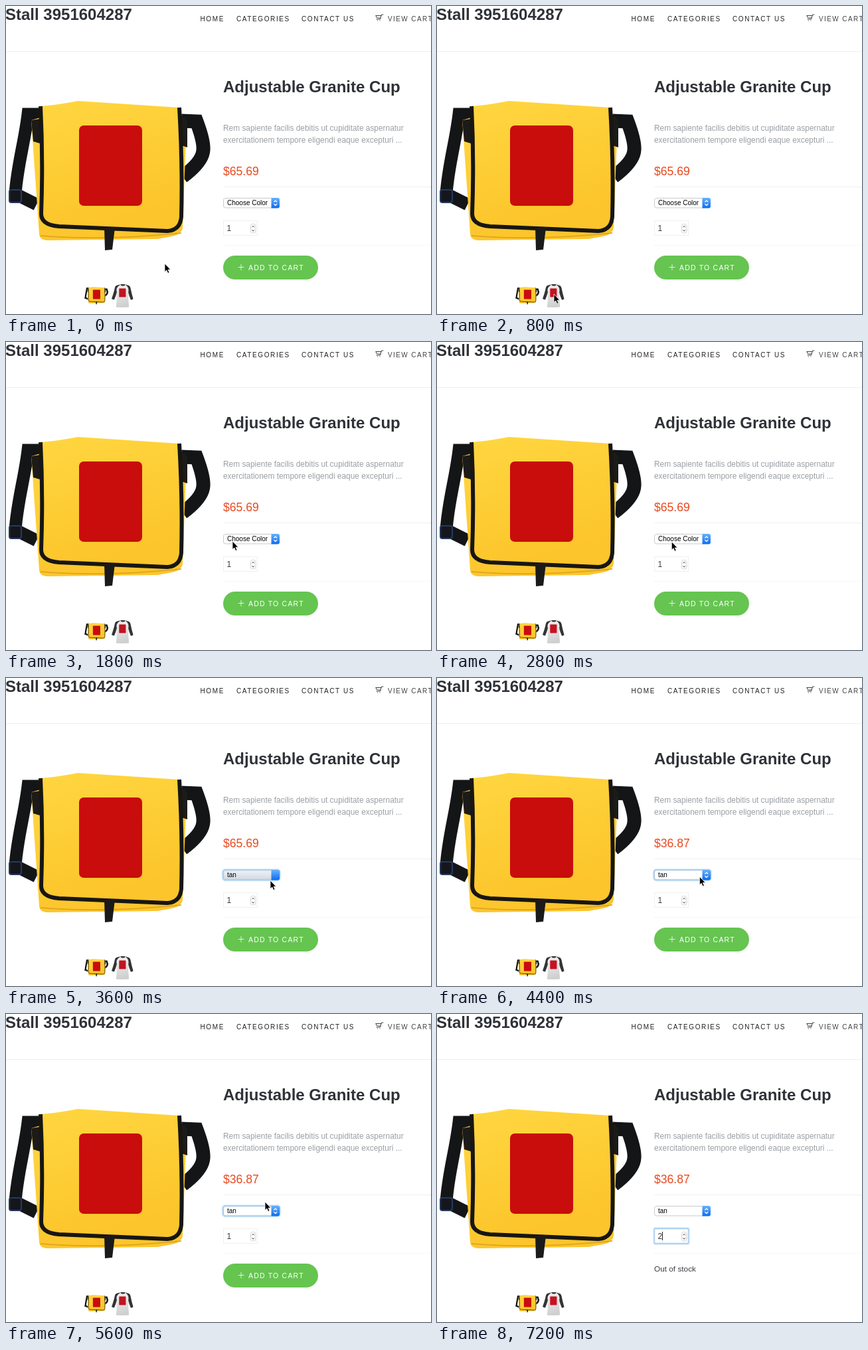
Animation, 640 px wide and 464 px high, one loop 7.4 s. Source, as an HTML page:

```html
<!DOCTYPE html>
<html lang="en">
<head>
<meta charset="utf-8">
<title>Product page</title>
<style>
  html, body { margin: 0; width: 100%; height: 100%; overflow: hidden; background: #fff; }
  svg { display: block; width: 100%; height: 100%; font-family: "Liberation Sans", Arial, sans-serif; }
  .title { font-size: 24px; font-weight: bold; fill: #2f3238; }
  .nav { font-size: 10px; letter-spacing: 1.6px; fill: #222; }
  .nav .light { letter-spacing: 1.4px; fill: #444; }
  .body { font-size: 11.9px; fill: #9a9fa5; }
  .dark { fill: #3a3d42; }
  .line { fill: none; stroke: #efefef; }
  .icon { fill: none; stroke-linecap: round; stroke-linejoin: round; }
  .ring { fill: none; stroke: #a5cdf0; stroke-width: 1.3; filter: drop-shadow(0 0 .8px #a5cdf0); }
</style>
</head>
<body>
<svg viewBox="0 0 640 464">
  <defs>
    <linearGradient id="yellow" x2=".3" y2="1">
      <stop stop-color="#ffd640"/><stop offset="1" stop-color="#fcc52b"/>
    </linearGradient>
    <linearGradient id="cloth" x2=".15" y2="1">
      <stop stop-color="#efeff0"/><stop offset=".5" stop-color="#e2e2e3"/>
      <stop offset="1" stop-color="#cfcfd0"/>
    </linearGradient>
    <linearGradient id="blue" x2="0" y2="1">
      <stop stop-color="#69b1fa"/><stop offset="1" stop-color="#0d6cf2"/>
    </linearGradient>
    <linearGradient id="gray" x2="0" y2="1">
      <stop stop-color="#f0f2f5"/><stop offset="1" stop-color="#d3d9e1"/>
    </linearGradient>

    <g id="bag">
      <g fill="none" stroke="#141517">
        <path d="M50 163H33C28 205 17 240 14 283L46 299" stroke-width="19"/>
        <path d="M264 173L287 174C293 190 298 206 297 217Q296 235 266 257" stroke-width="21"/>
      </g>
      <rect x="5" y="277" width="18" height="19" rx="3" fill="#15161b" stroke="#26395f" stroke-width="2"/>
      <path d="M38 172L52 168H264L272 172L266 334Q264 345 250 347L228 351L62 353Q50 352 50 343Z" fill="url(#yellow)"/>
      <path d="M52 346Q150 354 264 342" fill="none" stroke="#d9a01c" stroke-width="1.500"/>
      <path d="M38 172L51 170V207L41 204ZM264 164L273 172V213L264 210Z" fill="#1d1b18"/>
      <path d="M52 151Q85 148 108 143L261 153Q266 240 264 318Q262 338 243 339L80 332Q53 330 53 313Q56 230 52 151Z" fill="url(#yellow)"/>
      <path d="M261 153Q266 240 264 318Q262 338 243 339L80 332Q53 330 53 313Q56 230 52 151" fill="none" stroke="#171614" stroke-width="6"/>
      <path d="M148 334H164L160 367L149 368Z" fill="#1b1a1a"/>
      <rect x="110" y="180" width="95" height="121" rx="7" fill="#c90c0c"/>
    </g>

    <g id="shirt">
      <path d="M131 112Q165 130 199 112L238 175Q228 270 244 390Q242 400 230 401Q150 406 77 402Q92 290 84 175Z" fill="url(#cloth)"/>
      <path d="M132 109C126 124 88 132 83 180L87 207C80 242 66 275 54 306Q34 305 20 293C36 247 52 200 60 155Q64 130 82 121Z" fill="#333436"/>
      <path d="M198 109C204 124 234 132 238 180L235 210C241 244 254 275 267 307Q287 304 298 294C284 247 272 200 264 155Q260 134 244 123Z" fill="#333436"/>
      <path d="M131 108Q165 102 199 109Q193 128 165 128Q138 127 131 108Z" fill="#2a2b2d"/>
      <path d="M141 110Q165 106 189 110Q181 119 165 119Q149 119 141 110Z" fill="#4b4c50"/>
      <rect x="116" y="159" width="87" height="112" rx="6" fill="#c5131f"/>
    </g>
  </defs>

  <rect width="640" height="464" fill="#fff"/>
  <text class="title" x="-1" y="21">Stall 3951604287</text>
  <g class="nav">
    <text x="292.5" y="23">HOME</text>
    <text x="347" y="23">CATEGORIES</text>
    <text x="445" y="23">CONTACT US</text>
    <text class="light" x="575" y="23">VIEW CART</text>
  </g>
  <path class="icon" stroke="#444" d="M568 13H565.500L563.500 20H558M557 14.500H565M557 14.500L558.500 18H564M559.500 22V22.100M563 22V22.100"/>
  <path class="line" d="M0 68.500H640M328 272.500H640"/>
  <path class="line" d="M328 360.500H640" stroke-dasharray="2 2"/>

  <use id="photo" href="#bag"/>
  <use href="#bag" transform="translate(118 406.400) scale(.117)"/>
  <use href="#shirt" transform="translate(156.700 406.800) scale(.117)"/>

  <text class="title" x="327" y="130" font-size="24.500">Adjustable Granite Cup</text>
  <text class="body" x="327" y="188">Rem sapiente facilis debitis ut cupiditate aspernatur</text>
  <text class="body" x="327" y="206">exercitationem tempore eligendi eaque excepturi ...</text>
  <text id="price" x="327" y="255" font-size="17.600" fill="#e9491f"></text>

  <rect id="colorBox" x="327.500" y="289.500" width="84" height="14.500" rx="3" stroke="#c9c9c9"/>
  <rect id="colorRing" class="ring" x="326.500" y="289" width="86" height="15.500" rx="3.500"/>
  <path d="M399.500 289H409Q412 289 412 292V301.500Q412 304.500 409 304.500H399.500Z" fill="url(#blue)"/>
  <path id="colorArrows" class="icon" stroke="#fff" stroke-width="1.200" d="M403.800 295L405.800 293L407.800 295M403.800 298.500L405.800 300.500L407.800 298.500"/>
  <text id="color" x="333" y="300" font-size="10"></text>

  <rect x="327.500" y="323.500" width="51" height="22" fill="#fff" stroke="#f0f0f0"/>
  <rect id="countRing" class="ring" x="327" y="323" width="52" height="23" rx="1"/>
  <text id="count" class="dark" x="332.500" y="338.500" font-size="12"></text>
  <path id="caret" stroke="#222" d="M339.500 328V341"/>
  <rect x="368.500" y="328.500" width="7.500" height="13.500" rx="3" fill="#fff" stroke="#d4d4d4"/>
  <path class="icon" stroke="#444" d="M370.700 333L372.200 331.300L373.700 333M370.700 337.500L372.200 339.200L373.700 337.500"/>

  <g id="button">
    <rect x="327" y="376" width="143" height="36" rx="18" fill="#65c550"/>
    <path d="M349.500 393.500H358.500M354 389V398" stroke="#fff" stroke-width=".8"/>
    <text x="365" y="398" font-size="10.500" letter-spacing="1.200" fill="#fff">ADD TO CART</text>
  </g>
  <text id="soldOut" class="dark" x="327" y="388" font-size="11.800">Out of stock</text>

  <path id="cursor" d="M0 0V12.500L2.800 10L4.800 14.500L7 13.500L5 9.200H8.800Z" fill="#000" stroke="#fff" stroke-width=".8"/>
</svg>
<script>
  const LOOP = 7400, STEP = 200;
  const $ = id => document.getElementById(id);
  const show = (id, on) => $(id).setAttribute("visibility", on ? "visible" : "hidden");

  // time, x, y
  const path = [
    [0, 239, 388], [200, 239, 388], [800, 176, 434], [1200, 140, 434],
    [1800, 341, 300], [2600, 345, 300], [3400, 398, 305], [3800, 398, 305],
    [4800, 394, 296], [5600, 390, 283], [6200, 348, 333], [LOOP, 348, 333]
  ];

  function cursorAt(t) {
    const i = path.findIndex(p => p[0] > t);
    const [t0, x0, y0] = path[i - 1], [t1, x1, y1] = path[i];
    const u = (t - t0) / (t1 - t0), k = u * u * (3 - 2 * u);
    return [x0 + (x1 - x0) * k, y0 + (y1 - y0) * k];
  }

  function draw(t) {
    const between = (a, b = LOOP) => t >= a && t < b;
    const blue = between(4600, 5400), pressed = between(3600, 3800);
    const typed = between(6800), soldOut = between(7000);

    $("photo").setAttribute("href", blue ? "#shirt" : "#bag");
    $("price").textContent = t < 3800 || blue ? "$65.69" : "$36.87";
    $("color").textContent = t < 3600 ? "Choose Color" : blue ? "blue" : "tan";
    $("colorBox").setAttribute("fill", pressed ? "url(#gray)" : "#fff");
    show("colorRing", between(3600, 6400));
    show("colorArrows", !pressed);

    $("count").textContent = typed ? "2" : "1";
    show("countRing", between(6400));
    show("caret", between(6400));
    show("button", !soldOut);
    show("soldOut", soldOut);

    show("cursor", !typed);
    $("cursor").setAttribute("transform", `translate(${cursorAt(t)})`);
  }

  const start = performance.now();
  function tick() {
    const t = (performance.now() - start) % LOOP;
    draw(Math.floor(t / STEP) * STEP);
    requestAnimationFrame(tick);
  }
  tick();
</script>
</body>
</html>
```
